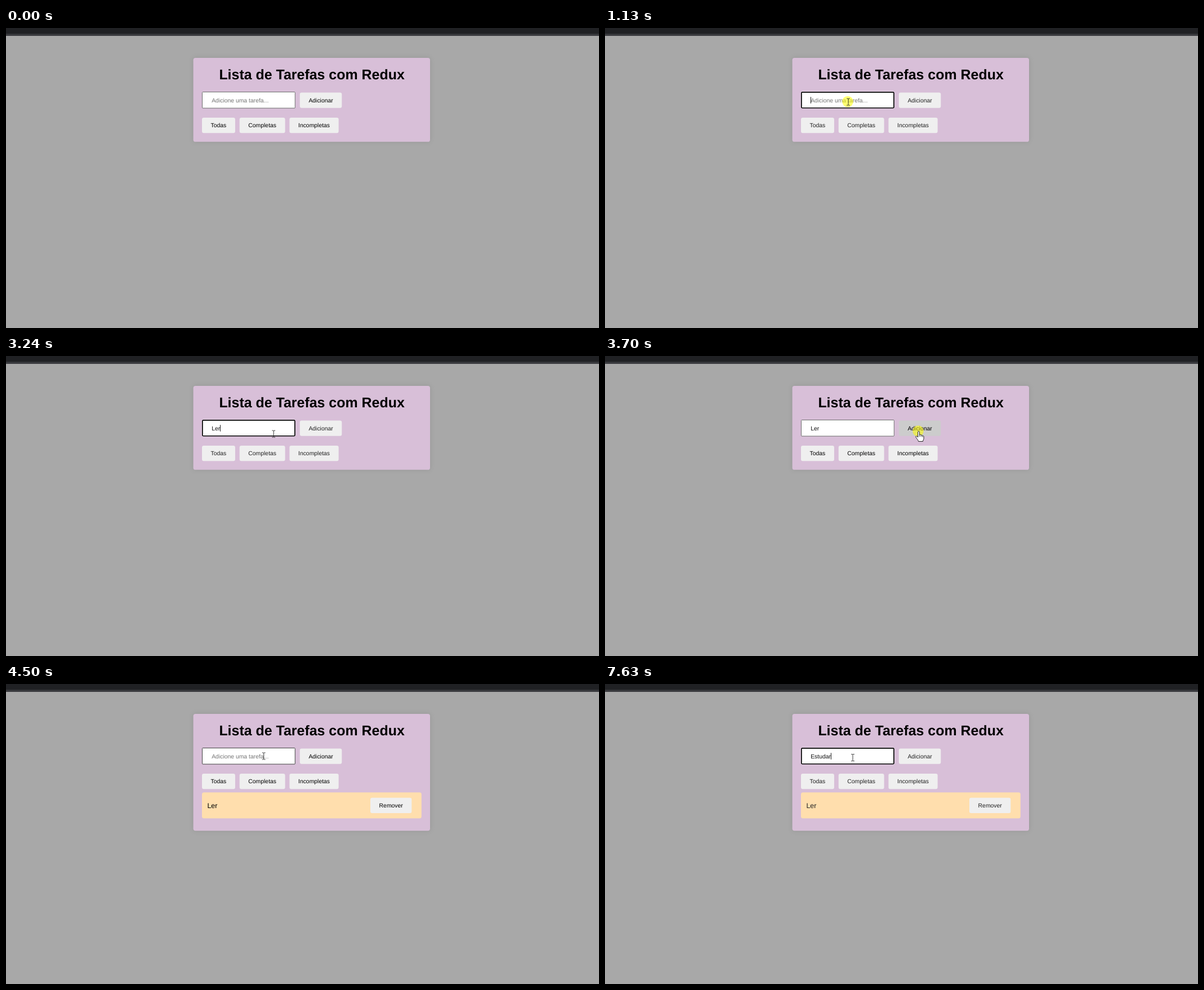
Write an HTML page that moves like this. It is 1053 by 532 pixels and loops after 8 s.

```html
<!DOCTYPE html>
<html lang="pt">
<head>
<meta charset="utf-8">
<title>Lista de Tarefas</title>
<style>
  html, body { margin: 0; width: 100%; height: 100%; overflow: hidden; background: #a8a8a8; }
  svg { display: block; width: 100%; height: 100%; }
  text {
    font: 10.4px "Liberation Sans", Arial, sans-serif;
    text-rendering: geometricPrecision;
    white-space: pre;
  }
  .title { font-size: 24.95px; font-weight: bold; }
  .task { font-size: 12.45px; }
  .ink { fill: #000; }
  .soft .ink { fill: #222; }
  .card { fill: #d8bfd8; filter: drop-shadow(0 0 4px rgba(0, 0, 0, .1)); }
  .line { fill: none; stroke: #222; stroke-width: .9; }
  .shape { fill: #fff; stroke: #111; stroke-width: .9; stroke-linejoin: round; }
</style>
</head>
<body>
<svg id="stage" viewBox="0 0 1053 532" preserveAspectRatio="none">
  <rect width="1053" height="532" fill="#a8a8a8"/>
  <rect width="1053" height="14" fill="#3a3b3f"/>
  <rect width="1053" height="10.3" fill="#202124"/>
  <rect id="card" class="card" x="332.6" y="53" width="420.4" height="148.8" rx="3.9"/>
  <text class="title" x="378.4" y="91.3">Lista de Tarefas com Redux</text>

  <rect id="ring" x="347.6" y="112.4" width="166.6" height="30.4" rx="2.4" fill="none" stroke="#fff" stroke-opacity=".4" stroke-width=".7"/>
  <rect id="field" fill="#fff"/>
  <text id="hint" x="365.2" y="131.8" fill="#757575">Adicione uma tarefa...</text>
  <text id="typed" x="365.2" y="131.8" fill="#111"></text>
  <rect id="caret" y="122.2" width=".9" height="11.6"/>

  <g id="buttons"></g>
  <g id="item">
    <rect x="348" y="192.3" width="389.8" height="46" rx="3.5" fill="#ffdead"/>
    <text class="task ink" x="357.4" y="219.7">Ler</text>
  </g>

  <circle id="glow" r="9.8" fill="#ff0" fill-opacity=".55"/>
  <g id="pointer">
    <path id="arrow" class="shape" d="M0 0V13L3 10.2L5 14.8L7 14L5 9.4H9Z"/>
    <path id="beam" class="line" d="M-2.8 -6H-.8L0 -5.3L.8 -6H2.8M0 -5.3V5.3M-2.8 6H-.8L0 5.3L.8 6H2.8"/>
    <g id="hand">
      <path class="shape" d="M-1.4 1.2C-1.4 -.3 1.4 -.3 1.4 1.2V6.2C2 5.3 4 5.5 4.1 7C5 6.3 6.6 6.8 6.7 8C7.6 7.5 9 8 9 9.4V13C9 15 7.6 15.6 7.4 18H-.4C-.8 15.5 -3.5 13 -5 10.4C-5.8 9 -4 7.8 -2.8 9L-1.4 10.6Z"/>
      <path class="line" d="M1.4 6.2V9.4M4.1 7V9.8M6.7 8V10.2M-1.4 10.6V8"/>
    </g>
  </g>
</svg>
<script>
const LOOP = 8000, BLINK = 530, STEP = 60, FOCUS_PRESS = 130, SEND_PRESS = 70;
const $ = id => document.getElementById(id);
const show = (id, on) => $(id).setAttribute("display", on ? "inline" : "none");
const set = (el, attrs) => {
  for (const key in attrs) el.setAttribute(key, attrs[key]);
  return el;
};
const make = (parent, tag, attrs) =>
  parent.appendChild(set(document.createElementNS("http://www.w3.org/2000/svg", tag), attrs));

const PAD = 15.6, GAP = 7.8;
function button(parent, label, x, y) {
  const box = make(parent, "rect", { x, y, height: 27.3, rx: 3.2, fill: "#efefef" });
  const text = make(parent, "text", { class: "ink", x: x + PAD, y: y + 17.4 });
  text.textContent = label;
  const width = text.getComputedTextLength() + 2 * PAD;
  set(box, { width });
  return { box, end: x + width };
}
const addButton = button($("buttons"), "Adicionar", 521.8, 114.4).box;
["Todas", "Completas", "Incompletas"].reduce(
  (x, label) => button($("buttons"), label, x, 158.9).end + GAP, 348);
button($("item"), "Remover", 647, 201.7);

// Each move continues from the last one along a quadratic curve
const ENTRY = { x: 1056, y: 438 };
const moves = [
  { at: 310, steps: 3, via: { x: 700, y: 234 }, to: { x: 345, y: 30 } },
  { at: 590, steps: 5, via: { x: 265, y: 5 }, to: { x: 432, y: 131 } },
  { at: 3110, steps: 6, via: { x: 456, y: 144 }, to: { x: 557, y: 133.5 } },
  { at: 4380, steps: 5, via: { x: 438, y: 124 }, to: { x: 440, y: 130.5 } }
];
const sessions = [
  { focus: 1130, firstKey: 2120, pace: 365, word: "Ler", send: 3700 },
  { focus: 4910, firstKey: 5970, pace: 276, word: "Estudar", send: LOOP }
];
const addedAt = sessions[0].send + SEND_PRESS;

const curve = (a, b, c, u) => (1 - u) ** 2 * a + 2 * u * (1 - u) * b + u * u * c;
const within = (t, from, length) => t >= from && t < from + length;
const inside = (p, x, y, w, h) => !!p && p.x >= x && p.x <= x + w && p.y >= y && p.y <= y + h;

function pointerAt(t) {
  const i = moves.filter(m => m.at <= t).length - 1;
  if (i < 0) return null;
  const { at, steps, via, to } = moves[i];
  const from = i ? moves[i - 1].to : ENTRY;
  const u = Math.min(1, (Math.floor((t - at) / STEP) + 1) / steps);
  return { x: curve(from.x, via.x, to.x, u), y: curve(from.y, via.y, to.y, u) };
}

function drawField(focused, hovered) {
  const line = focused ? 1.7 : 1;
  set($("field"), {
    x: 348 + line / 2, y: 113 + line / 2, width: 165.8 - line, height: 29.6 - line,
    rx: focused ? 1.6 : 1,
    stroke: focused ? "#000" : hovered ? "#444" : "#6e6e6e",
    "stroke-width": line
  });
  show("ring", focused);
}

function drawTyping(t, session, focused) {
  let count = 0, last = 0;
  if (session) {
    const { focus, firstKey, pace, word } = session;
    count = Math.max(0, Math.min(word.length, Math.floor((t - firstKey) / pace) + 1));
    last = count ? firstKey + (count - 1) * pace : focus;
  }
  const typed = $("typed");
  typed.textContent = session ? session.word.slice(0, count) : "";
  show("hint", !count);
  show("caret", focused && Math.floor((t - last) / BLINK) % 2 === 0);
  set($("caret"), { x: 365.1 + (count ? typed.getComputedTextLength() : 0) });
}

function drawPointer(p, overField, overButton, pressed) {
  show("pointer", p);
  show("glow", pressed);
  if (!p) return;
  set($("pointer"), { transform: `translate(${p.x} ${p.y})` });
  set($("glow"), { cx: p.x - 1, cy: p.y - .5 });
  show("beam", overField);
  show("hand", overButton);
  show("arrow", !overField && !overButton);
}

function render(t) {
  const session = sessions.find(s => t >= s.focus && t < s.send + SEND_PRESS);
  const focused = !!session && t < session.send;
  const pressed = !!session &&
    (within(t, session.focus, FOCUS_PRESS) || within(t, session.send, SEND_PRESS));
  const pointer = pointerAt(t);
  const overField = inside(pointer, 348, 113, 166, 30);
  const overButton = inside(pointer, 522, 114, 75, 28);
  const added = t >= addedAt;

  $("stage").classList.toggle("soft", focused);
  set($("card"), { height: added ? 207.2 : 148.8 });
  show("item", added);
  set(addButton, { fill: overButton ? "#ccc" : "#efefef" });
  drawField(focused, overField);
  drawTyping(t, session, focused);
  drawPointer(pointer, overField, overButton, pressed);
}

const start = performance.now();
function tick() {
  render((performance.now() - start) % LOOP);
  requestAnimationFrame(tick);
}
tick();
</script>
</body>
</html>
```
